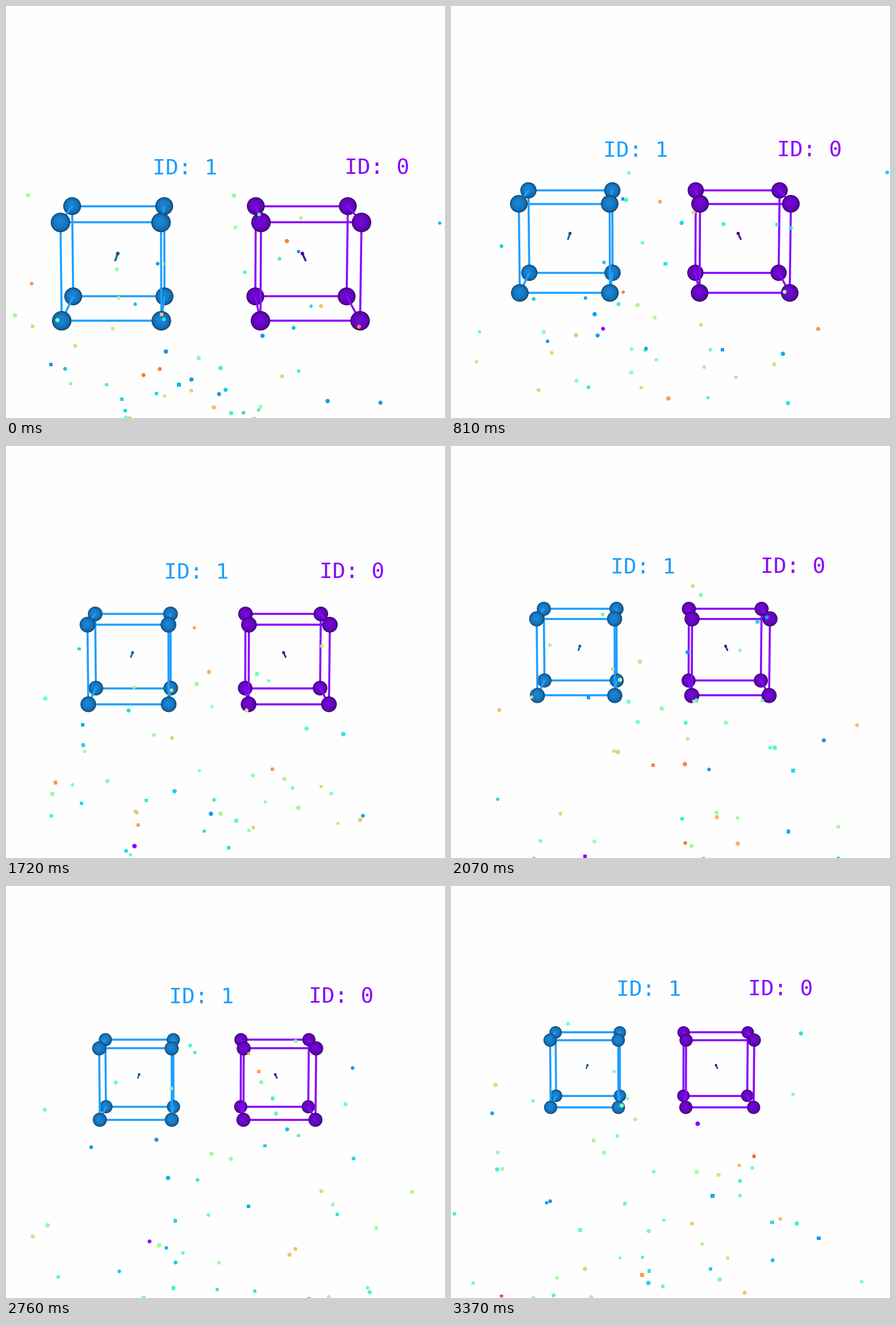
Recreate the animation shown at these times as a matplotlib script. Size 773x724 px, loop 3440 ms.

```python
import numpy as np
import matplotlib.pyplot as plt
from matplotlib.animation import FuncAnimation
from matplotlib.collections import LineCollection

W, H, DPI = 773, 724, 100
PT = 72 / DPI                      # points per pixel
TICK, LOOP = 20, 3440              # ms
STEPS = 50
SHORT_STEPS = (2, 4, 20, 36, 43, 46)
DELAYS = [60 if k in SHORT_STEPS else 70 for k in range(STEPS)]
STARTS = np.cumsum([0] + DELAYS[:-1])

# Camera: projected size of a unit is the inverse of its depth.
VANISH = np.array([340, 40])
NEAR, SPEED, DEPTH, TILT = 0.00565, 0.0000547, 0.00052, 0.00005
TOP, BOTTOM = 1.923, 2.925
BALL, EDGE_WIDTH = 0.097, 3.6

BLUE, PURPLE = np.array([30, 159, 255]) / 255, np.array([136, 8, 255]) / 255
CUBES = [(-1.379, BLUE), (0.616, PURPLE)]
COLORS = [color for _, color in CUBES]
SHELLS = np.linspace(1, 0.1, 10)
RAINBOW = plt.get_cmap("rainbow")


def scale(k, z, drop=0):
    return 1 / (NEAR + SPEED * k + DEPTH * z + TILT * drop)


def project(k, x, drop, z):
    y = TOP + (BOTTOM - TOP) * drop
    return VANISH + scale(k, z, drop) * np.array([x, y])


def face(k, left, z):
    corners = [(0, 0), (1, 0), (1, 1), (0, 1)]
    return np.array([project(k, left + x, drop, z) for x, drop in corners])


fig = plt.figure(figsize=(W / DPI, H / DPI), dpi=DPI, facecolor="#fefefe")
ax = fig.add_axes([0, 0, 1, 1])
ax.set(xlim=(0, W), ylim=(H, 0))
ax.axis("off")


def add_lines(per_cube, zorder, shade=1.0):
    colors = [c * shade for c in COLORS for _ in range(per_cube)]
    lines = LineCollection([], colors=colors, linewidths=EDGE_WIDTH * PT, zorder=zorder)
    ax.add_collection(lines)
    return lines


def add_balls(zorder):
    colors = []
    for shell in SHELLS:
        light = 0.46 + 0.38 * np.sqrt(1 - shell ** 2)
        colors += [c * light for c in COLORS for _ in range(4)]
    n = len(colors)
    return ax.scatter(np.zeros(n), np.zeros(n), c=colors, linewidths=0, zorder=zorder)


def area(diameter):
    return (diameter * PT) ** 2


def place_balls(balls, centers, radius):
    spots = [centers - 0.15 * radius * (1 - shell) for shell in SHELLS]
    balls.set_offsets(np.concatenate(spots))
    balls.set_sizes(area(2 * radius * np.repeat(SHELLS, len(centers))))


back_edges, back_balls = add_lines(4, 1), add_balls(2)
axis_lines = add_lines(1, 2, 0.62)
axis_tips = ax.scatter([0, 0], [0, 0], c=[c * 0.55 for c in COLORS], linewidths=0, zorder=2)
side_edges, front_edges, front_balls = add_lines(4, 3), add_lines(4, 4), add_balls(5)
round_dots = ax.scatter([], [], marker="o", linewidths=0, zorder=6)
square_dots = ax.scatter([], [], marker="s", linewidths=0, zorder=6)
labels = [ax.text(0, 0, text, color=color, family="DejaVu Sans Mono", size=38 * PT,
                  ha="left", va="baseline", zorder=7)
          for text, color in zip(("ID: 1", "ID: 0"), COLORS)]


def loop_edges(faces):
    return [pair for f in faces for pair in zip(f, np.roll(f, -1, axis=0))]


def draw_cubes(k):
    near, far = scale(k, 0), scale(k, 1)
    front = [face(k, left, 0) for left, _ in CUBES]
    back = [face(k, left, 1) for left, _ in CUBES]
    front_edges.set_segments(loop_edges(front))
    back_edges.set_segments(loop_edges(back))
    side_edges.set_segments(list(zip(np.concatenate(back), np.concatenate(front))))
    place_balls(front_balls, np.concatenate(front), BALL * near)
    place_balls(back_balls, np.concatenate(back), BALL * far)

    middles = [project(k, left + 0.5, 0.5, 0.5) for left, _ in CUBES]
    tips = [project(k, left + 0.5, 0.5, 0.89) for left, _ in CUBES]
    axis_lines.set_segments(list(zip(middles, tips)))
    axis_lines.set_linewidth(0.02 * near * PT)
    axis_tips.set_offsets(tips)
    axis_tips.set_sizes([area(0.036 * near)] * 2)

    labels[0].set_position((360.5 - 0.579 * near, -24.6 + 1.81 * near))
    labels[1].set_position((370.5 + 1.272 * near, -25.2 + 1.81 * near))


def draw_dots(k):
    rng = np.random.default_rng(400 + k)
    n = rng.integers(52, 62)
    x = rng.normal(340, 190, n)
    y = 726 - 520 * rng.beta(1, 2, n)
    value = np.clip(rng.normal(0.48, 0.2, n), 0.2, rng.uniform(0.78, 0.95))
    value[0] = 0
    size = area(rng.uniform(6, 8, n))
    square = rng.random(n) < 0.3
    for dots, mask in ((square_dots, square), (round_dots, ~square)):
        dots.set_offsets(np.column_stack([x, y])[mask])
        dots.set_sizes(size[mask] * (0.75 if dots is square_dots else 1))
        dots.set_facecolor(RAINBOW(value[mask]))


def draw(frame):
    now = (frame + 0.5) * TICK
    k = int(np.searchsorted(STARTS, now, side="right")) - 1
    draw_cubes(k)
    draw_dots(k)
    return []


anim = FuncAnimation(fig, draw, frames=LOOP // TICK, interval=TICK,
                     init_func=lambda: [], repeat=True, repeat_delay=0, blit=False)
plt.show()
```
